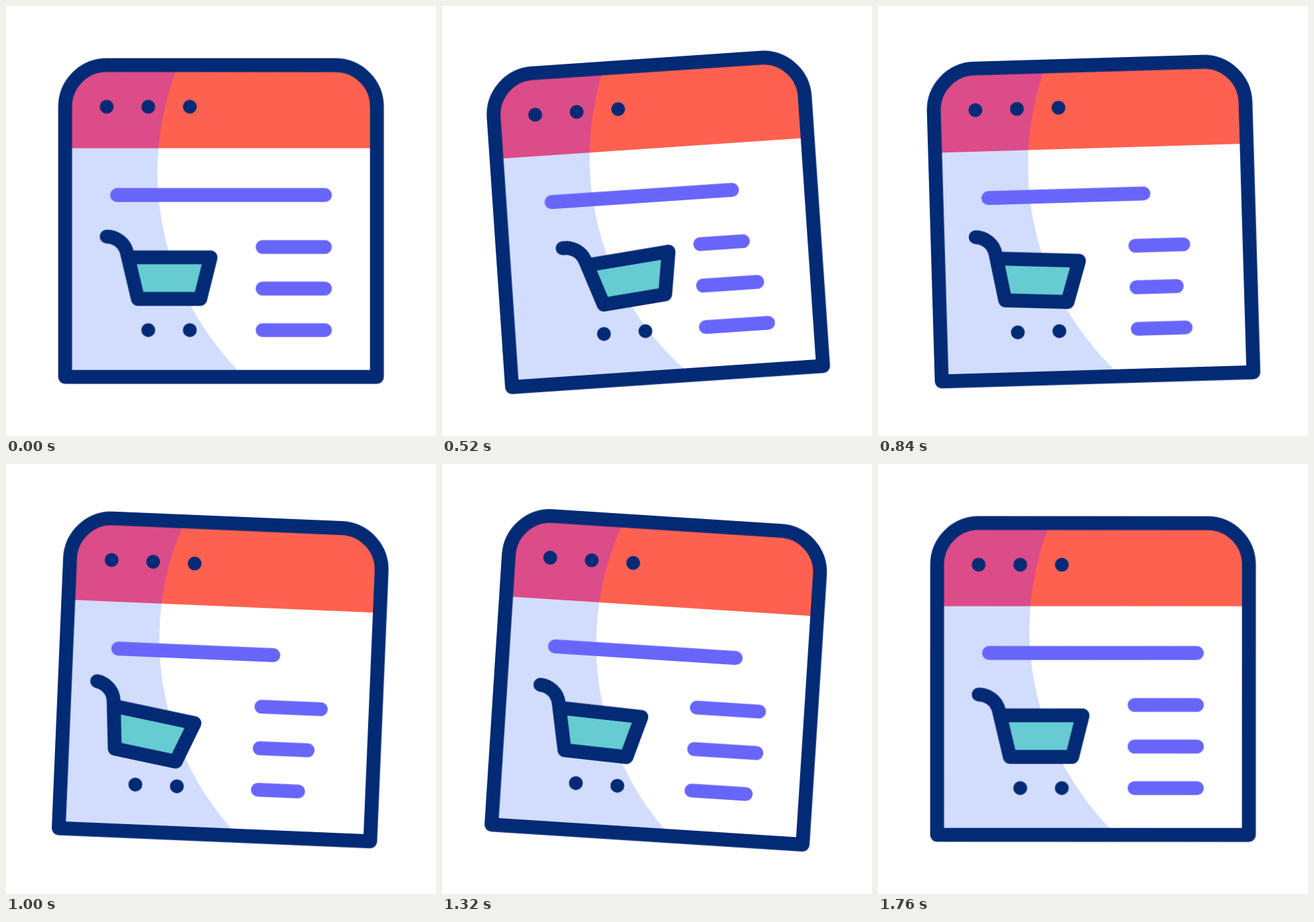
These frames come from a looping animation (640 by 640 pixels, 1.84 s). An HTML page without scripts:

```html
<!DOCTYPE html>
<html lang="en">
<head>
<meta charset="utf-8">
<title>Online shop</title>
<style>
  html, body { margin: 0; width: 100%; height: 100%; overflow: hidden; background: #fff; }
  svg { display: block; width: 100%; height: 100%; }

  .navy { fill: #022a75; }
  .outline, .rule {
    fill: none; stroke: #022a75; stroke-width: 20;
    stroke-linecap: round; stroke-linejoin: round;
  }
  .rule { stroke: #6866fa; }

  .window, .roll, .tilt, .wheels, .rule {
    animation: 1.84s ease-in-out infinite;
  }
  .window { animation-name: sway; transform-origin: 256px 256px; }
  .roll { animation-name: roll; }
  .tilt { animation-name: tilt; transform-origin: 165.8px 323.9px; }
  .wheels { animation-name: wheels; }

  .long { stroke-dasharray: 300 400; animation-name: trim-long; animation-delay: .12s; }
  .short { stroke-dasharray: 90 400; animation-name: trim-short; animation-delay: var(--wait); }

  @keyframes sway {
    0%, 1.087% { transform: rotate(0deg); }
    34.783% { transform: rotate(-4.2deg); }
    63.587% { transform: rotate(4.2deg); }
    96.739%, 100% { transform: rotate(0deg); }
  }
  @keyframes roll {
    0%, 6.522% { transform: translateX(0); }
    30.435% { transform: translateX(31px); }
    54.348% { transform: translateX(-22px); }
    79.891%, 100% { transform: translateX(0); }
  }
  @keyframes tilt {
    0%, 8.696% { transform: rotate(0deg); }
    32.609% { transform: rotate(-6deg); }
    56.522% { transform: rotate(9.8deg); }
    80.435%, 100% { transform: rotate(0deg); }
  }
  @keyframes wheels {
    0%, 2.174% { transform: translateX(0); }
    30.435% { transform: translateX(17.75px); }
    51.087% { transform: translateX(-12.4px); }
    80.435%, 100% { transform: translateX(0); }
  }
  @keyframes trim-long {
    0%, 86.957%, 100% { stroke-dasharray: 300 400; }
    43.478% { stroke-dasharray: 222.5 400; }
  }
  @keyframes trim-short {
    0%, 52.174%, 100% { stroke-dasharray: 90 400; }
    26.087% { stroke-dasharray: 57.6 400; }
  }
</style>
</head>
<body>
<svg viewBox="0 0 640 640" aria-hidden="true">
  <defs>
    <path id="frame" d="M31 481V91a60 60 0 0 1 60-60H421a60 60 0 0 1 60 60V481Z"/>
    <clipPath id="inside"><use href="#frame"/></clipPath>
    <!-- area left of the large arc -->
    <path id="shade" d="M31 31H194.3A411 411 0 0 0 290 481H31Z"/>
    <clipPath id="shaded"><use href="#shade"/></clipPath>
  </defs>

  <g transform="translate(56 56) scale(1.03125)">
    <g class="window">
      <g clip-path="url(#inside)">
        <use href="#shade" fill="#d2dcfd"/>
        <path d="M31 31H481V151H31Z" fill="#ff6150"/>
        <path d="M31 31H481V151H31Z" fill="#dc4c88" clip-path="url(#shaded)"/>
      </g>
      <use href="#frame" class="outline"/>

      <g class="navy">
        <circle cx="91" cy="91" r="10"/>
        <circle cx="151" cy="91" r="10"/>
        <circle cx="211" cy="91" r="10"/>
      </g>

      <path class="rule long" d="M106 218.5H406"/>
      <path class="rule short" style="--wait:.16s" d="M316 293.5H406"/>
      <path class="rule short" style="--wait:.32s" d="M316 353.5H406"/>
      <path class="rule short" style="--wait:.56s" d="M316 413.5H406"/>

      <g class="roll">
        <g class="tilt">
          <path d="M121 308.5H241L226 368.5H136Z" fill="#67cbd2"/>
          <path class="outline" d="M91 278.5c13.8 0 25.8 9.4 29.1 22.7L136 368.5H226L241 308.5H122"/>
        </g>
      </g>
      <g class="wheels navy">
        <circle cx="151" cy="413.5" r="10"/>
        <circle cx="211" cy="413.5" r="10"/>
      </g>
    </g>
  </g>
</svg>
</body>
</html>
```
